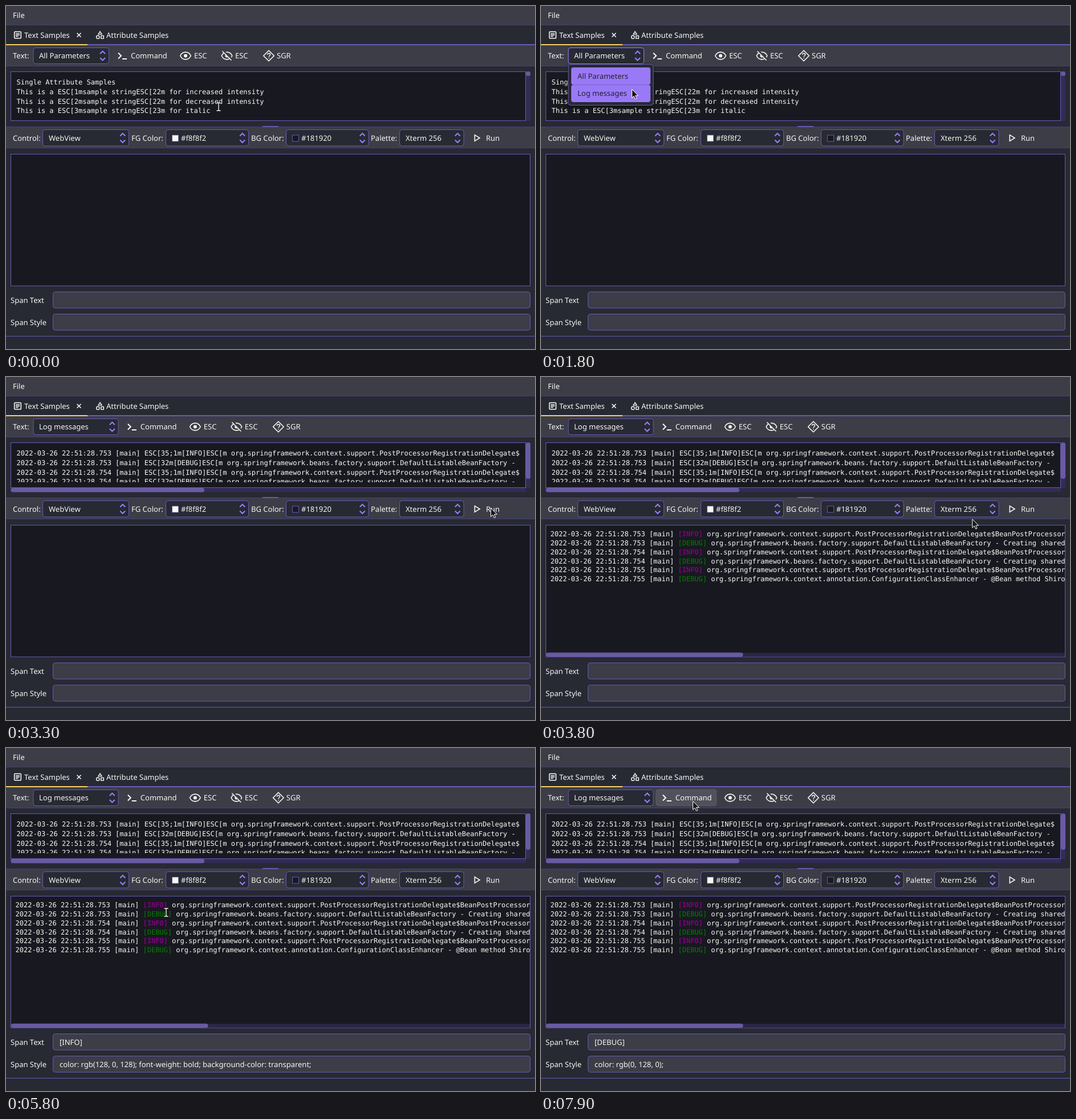
An HTML page for the animation above (8 s loop, 928 by 603 pixels).

```html
<!DOCTYPE html>
<html lang="en">
<head>
<meta charset="utf-8">
<title>Text Samples</title>
<style>
  html, body { margin: 0; width: 100%; height: 100%; overflow: hidden; background: #272933; }
  svg { display: block; width: 928px; height: 603px; }
  text { font: 13px "Noto Sans", "Open Sans", sans-serif; fill: #f8f8f2; text-rendering: geometricPrecision; white-space: pre; }
  .mono text { font: 12px "DejaVu Sans Mono", "Noto Sans Mono", monospace; }
  #editor text { font-size: 12.02px; }
  .bar { fill: #3c3d47; }
  .rule { fill: #483f78; }
  .box { fill: #272933; stroke: #685ab3; }
  .pane { fill: #181920; stroke: #685ab3; }
  .field { fill: #3c3d47; stroke: #685ab3; }
  .focus { stroke: #9580ff; }
  .thumb { fill: #6a5aa3; }
  .track { fill: #342b58; }
  .hover { fill: #50515c; stroke: #5c5d68; }
  .pick { fill: #9a79f8; }
  .dark { fill: #22232e; }
  .icon { fill: none; stroke: #f8f8f2; stroke-width: 1.6; }
  .solid { fill: #f8f8f2; stroke: none; }
  .chev { fill: none; stroke: #9580ff; stroke-width: 2; }
  .info { fill: #800080; font-weight: bold; }
  .debug { fill: #008000; }
</style>
</head>
<body>
<svg viewBox="0 0 928 603">
  <defs>
    <path id="chev" class="chev" d="M-4.5-3.5L0-8L4.5-3.5M-4.5 3.5L0 8L4.5 3.5"/>
    <g id="eye" class="icon" stroke-width="2">
      <path d="M-9.3 0C-5.5-8.5 5.5-8.5 9.3 0C5.5 8.5-5.5 8.5-9.3 0Z"/>
      <circle class="solid" r="3"/>
    </g>
    <clipPath id="editorClip"><rect id="editorClipBox" x="18" y="124" width="884" height="72"/></clipPath>
    <clipPath id="outClip"><rect x="9" y="261" width="910" height="223"/></clipPath>
    <filter id="shadow" x="-20%" y="-20%" width="140%" height="150%">
      <feDropShadow dx="0" dy="2" stdDeviation="3" flood-color="#000" flood-opacity=".5"/>
    </filter>
  </defs>

  <rect width="928" height="603" fill="#272933"/>

  <!-- menu and tabs -->
  <rect class="bar" width="928" height="33"/>
  <rect class="rule" y="33" width="928" height="1"/>
  <text x="12" y="21">File</text>
  <rect y="67" width="928" height="2" fill="#685ab3"/>
  <rect y="67" width="143" height="2" fill="#f6cf68"/>
  <g class="icon">
    <rect x="14.7" y="45.2" width="11.6" height="11.6" rx="1"/>
    <path d="M17 48.5H24M17 51H24M17 53.5H21.5" stroke-width="1.4"/>
    <path d="M124.5 47.5L131.5 54.5M131.5 47.5L124.5 54.5"/>
    <path d="M165 44.8L168 49.6H162Z" stroke-width="1.4"/>
    <circle cx="161.2" cy="54.7" r="2.7" stroke-width="1.4"/>
    <rect x="166.7" y="52.4" width="4.6" height="4.6" stroke-width="1.4"/>
  </g>
  <text x="32" y="56">Text Samples</text>
  <text x="176" y="56">Attribute Samples</text>

  <!-- upper toolbar -->
  <rect class="bar" y="69" width="928" height="36"/>
  <rect class="rule" y="105" width="928" height="1"/>
  <text x="12" y="92">Text:</text>
  <rect id="combo" class="box" x="48" y="73.5" width="132.5" height="28" rx="4"/>
  <text id="comboText" x="58" y="92"></text>
  <g id="tools">
    <use href="#chev" x="169.5" y="87.5"/>
    <rect id="commandHover" class="hover" x="185" y="73" width="106" height="28.5" rx="4"/>
    <path class="icon" style="stroke-width:2" d="M197 82.5L202 87.5L197 92.5M204 93H212"/>
    <text x="219" y="92">Command</text>
    <use href="#eye" x="315" y="87.5"/>
    <text x="330" y="92">ESC</text>
    <use href="#eye" x="387.5" y="87.5"/>
    <path d="M380 78L397 95" stroke="#3c3d47" stroke-width="4"/>
    <path class="icon" d="M379.5 79.5L395.5 95.5"/>
    <text x="402" y="92">ESC</text>
    <path class="icon" d="M461 78.2L470.3 87.5L461 96.8L451.7 87.5Z" stroke-linejoin="round"/>
    <path class="icon" style="stroke-width:1.4" d="M458.6 85.6C458.6 82.4 463.6 82.4 463.6 85.6C463.6 87.2 461.1 87.3 461.1 89.6M461.1 91V92.5"/>
    <text x="475" y="92">SGR</text>
  </g>

  <!-- editor -->
  <rect id="vTrack" class="track" x="912" y="115" width="8" height="87"/>
  <rect id="vThumb" class="thumb" x="912" y="115" width="8" height="8" rx="4"/>
  <rect id="editorPane" class="pane" x="8.5" y="115.5" width="903" height="86"/>
  <g id="hBar">
    <rect class="track" x="8" y="195" width="904" height="7"/>
    <rect class="thumb" x="8.5" y="195" width="339.5" height="7.5" rx="3.7"/>
  </g>
  <g id="editor" class="mono" clip-path="url(#editorClip)">
    <g id="samples"></g>
    <g id="logs"></g>
  </g>

  <!-- lower toolbar -->
  <rect class="rule" y="212" width="928" height="1"/>
  <rect x="450" y="211" width="28" height="2" fill="#685ab3"/>
  <rect class="bar" y="213" width="928" height="36"/>
  <rect class="rule" y="249" width="928" height="1"/>
  <text x="12" y="237">Control:</text>
  <text x="220" y="237">FG Color:</text>
  <text x="430" y="237">BG Color:</text>
  <text x="640" y="237">Palette:</text>
  <g id="combos"></g>
  <rect x="291.5" y="227" width="11" height="11" fill="#f8f8f2" stroke="#685ab3" stroke-width=".7"/>
  <rect x="502.5" y="227" width="11" height="11" fill="#181920" stroke="#685ab3"/>
  <rect id="runHover" class="hover" x="808" y="217.5" width="67.5" height="28.5" rx="4"/>
  <path class="icon" d="M822.3 226.6L831 232L822.3 237.4Z"/>
  <text x="842" y="237">Run</text>

  <!-- output -->
  <rect class="pane" x="8.5" y="260.5" width="911" height="231.5"/>
  <g id="output" class="mono" clip-path="url(#outClip)"></g>
  <g id="outBar">
    <rect class="track" x="9" y="485" width="910" height="7" opacity=".7"/>
    <rect class="thumb" x="9" y="484.5" width="345.5" height="7.5" rx="3.7"/>
  </g>

  <text x="8" y="522">Span Text</text>
  <text x="8" y="561">Span Style</text>
  <rect class="field" x="82.5" y="502.5" width="837" height="28.5" rx="4"/>
  <rect class="field" x="82.5" y="541.5" width="837" height="28.5" rx="4"/>
  <text id="spanText" x="94" y="522"></text>
  <text id="spanStyle" x="94" y="561"></text>
  <rect y="580" width="928" height="1" fill="#685ab3"/>

  <g id="popup">
    <rect class="box" x="48" y="102.5" width="149" height="72" rx="4" filter="url(#shadow)"/>
    <rect class="pick" x="53" y="108" width="139" height="30.5" rx="4"/>
    <rect id="logPick" class="pick" x="53" y="138.5" width="139" height="30.5" rx="4"/>
    <text class="dark" x="64" y="128">All Parameters</text>
    <text id="logItem" x="64" y="158">Log messages</text>
  </g>

  <g id="pointer">
    <path id="arrow" d="M.5.5V15.5L4 12.3L6.4 17.6L8.8 16.5L6.5 11.4H11.3Z" fill="#15151a" stroke="#fff"/>
    <g id="beam" fill="none">
      <path d="M-3.5-7H-1L0-6L1-7H3.5M0-6V6M-3.5 7H-1L0 6L1 7H3.5" stroke="#111" stroke-width="3"/>
      <path d="M-3.5-7H-1L0-6L1-7H3.5M0-6V6M-3.5 7H-1L0 6L1 7H3.5" stroke="#fff" stroke-width="1.3"/>
    </g>
  </g>
</svg>
<script>
const LOOP = 8000, STEP = 100;
const $ = id => document.getElementById(id);
const show = (id, on) => $(id).setAttribute('visibility', on ? 'visible' : 'hidden');
const set = (id, attrs) => { for (const k in attrs) $(id).setAttribute(k, attrs[k]); };
const lines = (rows, x, y, pitch) =>
  rows.map((row, i) => `<text x="${x}" y="${y + i * pitch}">${row}</text>`).join('');

const spring = 'org.springframework.';
const registrar = spring + 'context.support.PostProcessorRegistrationDelegate$BeanPostProcessorChecker';
const factory = spring + 'beans.factory.support.DefaultListableBeanFactory - Creating shared instance';
const enhancer = spring + 'context.annotation.ConfigurationClassEnhancer - @Bean method ShiroConfig';
const log = [[753, 'INFO', registrar], [753, 'DEBUG', factory], [754, 'INFO', registrar],
  [754, 'DEBUG', factory], [755, 'INFO', registrar], [755, 'DEBUG', enhancer]];
const stamp = ms => `2022-03-26 22:51:28.${ms} [main] `;
const code = { INFO: '35;1', DEBUG: '32' };

// The editor does not wrap: it cuts each row at its visible width.
const rawLog = log.slice(0, 4).map(([ms, level, msg]) =>
  `${stamp(ms)}ESC[${code[level]}m[${level}]ESC[m ${msg}`.slice(0, 122).replace(/Creat.*|C$/, ''));
const styledLog = log.map(([ms, level, msg]) =>
  `${stamp(ms)}<tspan class="${level.toLowerCase()}">[${level}]</tspan> ${msg}`);
const sample = (on, off, name) => `This is a ESC[${on}msample stringESC[${off}m for ${name}`;

$('samples').innerHTML = lines(['Single Attribute Samples', sample(1, 22, 'increased intensity'),
  sample(2, 22, 'decreased intensity'), sample(3, 23, 'italic')], 18.5, 138.3, 16.7);
$('logs').innerHTML = lines(rawLog, 18.5, 138.3, 16.7);
$('output').innerHTML = lines(styledLog, 16.5, 280.2, 15.8);
$('combos').innerHTML = [[64.5, 151, 75, 'WebView'], [280.5, 145, 307, '#f8f8f2'],
  [491.5, 144.5, 518, '#181920'], [690.5, 112.5, 701, 'Xterm 256']].map(([x, w, tx, label]) =>
  `<rect class="box" x="${x}" y="217.5" width="${w}" height="28.5" rx="4"/>
   <use href="#chev" x="${x + w - 10.8}" y="232"/><text x="${tx}" y="237">${label}</text>`).join('');

// Pointer moves: first step, last step, end x, end y.
const moves = [
  [0, 0, 373, 177], [100, 400, 245, 133], [600, 600, 228, 97], [700, 800, 168, 88],
  [1300, 1500, 160, 143], [1800, 1800, 159, 146], [2100, 2100, 174, 147], [2200, 2400, 512, 185],
  [2600, 2900, 850, 246], [3000, 3000, 853, 232], [3200, 3200, 850, 230], [3700, 4500, 428, 318],
  [4600, 4700, 342, 308], [4800, 5200, 265, 277], [5700, 5700, 275, 287], [5800, 5800, 281, 289],
  [5900, 5900, 286, 283], [6100, 6100, 275, 306], [6200, 6200, 270, 294], [6700, 6700, 286, 306],
  [6900, 6900, 277, 293], [7100, 7100, 304, 293], [7300, 7300, 310, 278], [7400, 7500, 328, 208],
  [7600, 7700, 301, 124], [7900, 7900, 266, 93]
];

function pointerAt(t) {
  let x = 0, y = 0;
  for (const [from, to, ex, ey] of moves) {
    if (t < from) break;
    const p = Math.min(1, (t - from + STEP) / (to - from + STEP));
    x += (ex - x) * p;
    y += (ey - y) * p;
  }
  return [x, y];
}

let last = -1;
function draw() {
  const t = Math.floor(performance.now() % LOOP / STEP) * STEP;
  requestAnimationFrame(draw);
  if (t === last) return;
  last = t;
  const within = (a, b) => t >= a && t < b;

  const open = within(1200, 1900), chosen = t >= 1900, loaded = t >= 2000;
  show('popup', open);
  show('logPick', open && t >= 1400);
  $('logItem').setAttribute('class', t >= 1400 ? 'dark' : '');
  $('combo').setAttribute('class', within(1200, 3200) ? 'box focus' : 'box');
  set('combo', { width: chosen ? 149 : 132.5 });
  $('comboText').textContent = chosen ? 'Log messages' : 'All Parameters';
  set('tools', { transform: `translate(${chosen ? 16.8 : 0})` });
  show('commandHover', within(600, 800) || t >= 7700);

  show('samples', !loaded);
  show('logs', loaded);
  show('hBar', loaded);
  set('editorPane', { height: loaded ? 79 : 86 });
  set('editorClipBox', { height: loaded ? 61 : 72 });
  set('vTrack', { height: loaded ? 80 : 87 });
  set('vThumb', { height: t >= 2600 ? 64 : 8 });

  show('runHover', within(3000, 3300) || within(3500, 3700));
  show('output', t >= 3500);
  show('outBar', t >= 3500);

  const span = t < 5500 ? ['', ''] : t < 6700
    ? ['[INFO]', 'color: rgb(128, 0, 128); font-weight: bold; background-color: transparent;']
    : ['[DEBUG]', 'color: rgb(0, 128, 0);'];
  $('spanText').textContent = span[0];
  $('spanStyle').textContent = span[1];

  const [x, y] = pointerAt(t);
  const overText = !open && x < 912 && (y > 115 && y < 202 || y > 260 && y < 492);
  set('pointer', { transform: `translate(${x} ${y})` });
  show('beam', overText);
  show('arrow', !overText);
}
draw();
</script>
</body>
</html>
```
